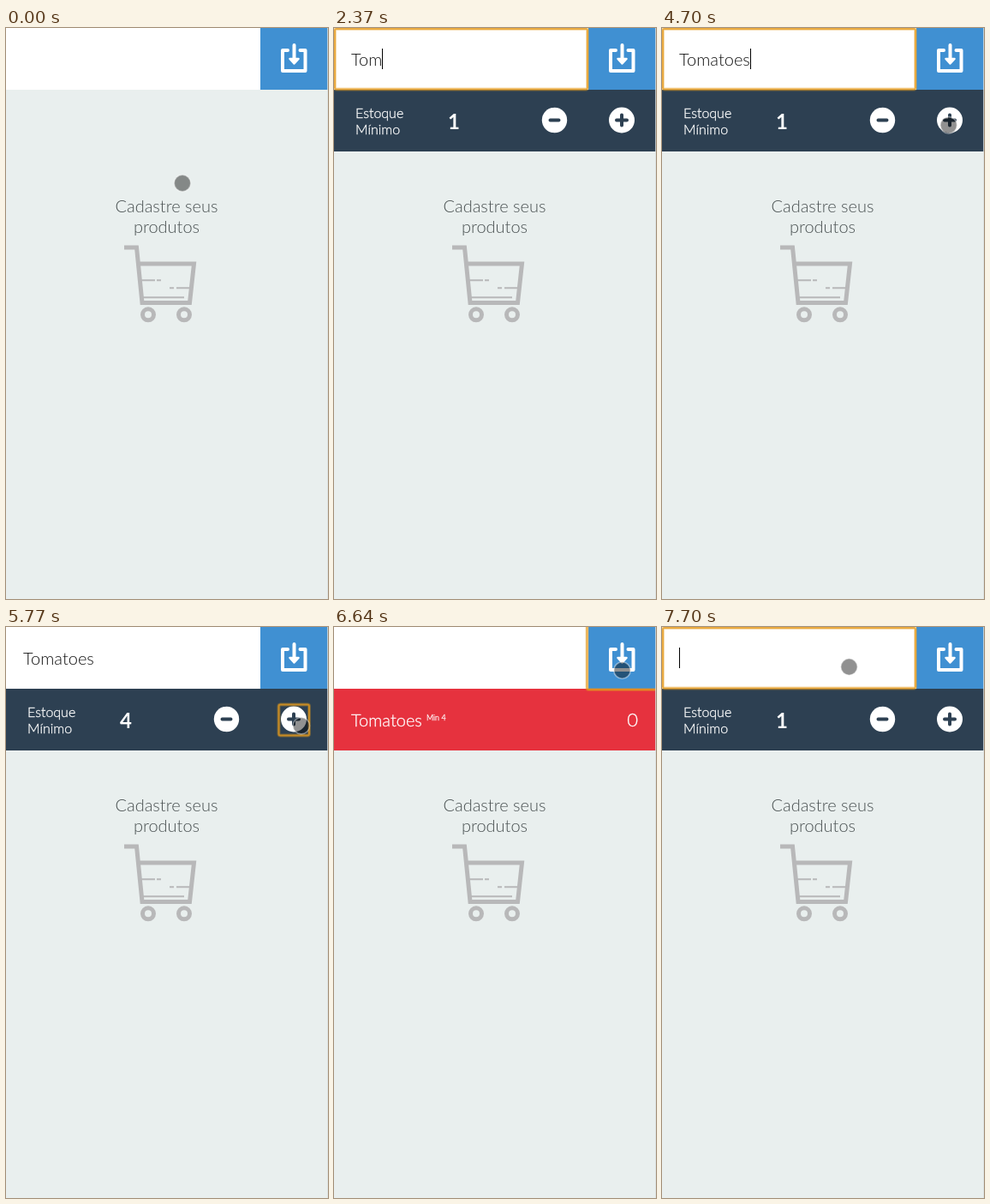
Animation, 376 px wide and 666 px high, one loop 8 s. Source, as an HTML page:

```html
<!DOCTYPE html>
<html lang="pt">
<head>
<meta charset="utf-8">
<title>Cadastro de produtos</title>
<style>
  html, body { margin: 0; width: 100%; height: 100%; overflow: hidden; background: #e9efee; }
  svg { display: block; font: 300 20px Lato, sans-serif; }
  .white { fill: #fff; stroke: #fff; stroke-width: .3; }
  .ring { fill: none; stroke: #e59a1c; }
  .ring rect:first-child { stroke-width: 4; opacity: .35; }
  .ring rect:last-child { stroke-width: 2; opacity: .75; }
</style>
</head>
<body>
<svg width="376" height="666" viewBox="0 0 376 666">
  <rect width="376" height="666" fill="#e9efee"/>
  <g fill="#4a5152" text-anchor="middle">
    <text x="187.5" y="215">Cadastre seus</text>
    <text x="187.5" y="239">produtos</text>
  </g>
  <g fill="none" stroke="#b8b8b9" stroke-width="5">
    <path d="M138 256H152.5L159 320.5H214.5L219.5 275H155"/>
    <circle cx="166" cy="334.300" r="6.500"/>
    <circle cx="208" cy="334.300" r="6.500"/>
    <path stroke-width="2" d="M157 294.300H174M176 294.300H181M191 303.300H196M199 303.300H214M160 314.300H208"/>
  </g>

  <rect width="297" height="72" fill="#fff"/>
  <text id="typed" x="20" y="44" fill="#111"></text>
  <rect id="caret" y="24" width="1" height="24" fill="#000"/>

  <g id="form">
    <rect y="72" width="376" height="72" fill="#2d4052"/>
    <g class="white" font-size="16">
      <text x="25" y="105">Estoque</text>
      <text x="25" y="124">Mínimo</text>
    </g>
    <text id="count" x="140" y="118" fill="#fff" font-size="24" font-weight="700" text-anchor="middle"></text>
    <g fill="#fff">
      <circle cx="257.500" cy="107.500" r="14.700"/>
      <circle cx="336" cy="107.500" r="15"/>
    </g>
    <path stroke="#2d4052" stroke-width="4" stroke-linecap="round" d="M252.500 107.500h10M330 107.500h12M336 101.500v12"/>
  </g>

  <g id="row">
    <rect y="72" width="376" height="72" fill="#e6323e"/>
    <text class="white" x="20" y="116">Tomatoes</text>
    <text class="white" x="108" y="109" font-size="9">Min 4</text>
    <text class="white" x="355" y="116" font-size="22" text-anchor="end">0</text>
  </g>

  <rect x="297" width="79" height="72" fill="#4090d2"/>
  <g fill="none" stroke="#fff" stroke-width="4" stroke-linecap="round" stroke-linejoin="round">
    <path d="M329 26H323V50H349.500V26H343.500M336.500 20V36"/>
    <path d="M331.500 36h10l-5 5.500z" fill="#fff" stroke-width="2.500"/>
  </g>

  <g id="inputRing" class="ring"></g>
  <g id="plusRing" class="ring"></g>
  <g id="saveRing" class="ring"></g>
  <rect x="375" width="1" height="666" fill="#d9dedd" opacity=".8"/>
  <circle id="pointer" r="9.700" fill="#000" fill-opacity=".43" stroke="#fff" stroke-opacity=".42" stroke-width="1.600"/>
</svg>
<script>
const LOOP = 8000;
const $ = id => document.getElementById(id);
const show = (id, on) => $(id).setAttribute('visibility', on ? 'visible' : 'hidden');
const within = (t, from, to) => t >= from && t < to;
const passed = (t, times) => times.filter(time => t >= time).length;

function ring(id, x, y, w, h) {
  const rect = `<rect x="${x}" y="${y}" width="${w}" height="${h}" rx="2"/>`;
  $(id).innerHTML = rect + rect;
}
ring('inputRing', 1, 1, 295, 70.5);
ring('plusRing', 318.5, 90.5, 35.5, 36);
ring('saveRing', 295.5, -2, 84, 75);

const keyTimes = [2040, 2170, 2370, 2570, 3040, 3100, 3240, 3640];
const clickTimes = [5040, 5440, 5770];
const STEP = 67;
const moves = [
  { start: 500, steps: 5, from: [206, 181], to: [103.5, 27.5] },
  { start: 4240, steps: 8, from: [106, 32], to: [345, 117] },
  { start: 5770, steps: 10, from: [345, 117], to: [336.5, 50.5] },
  { start: 6970, steps: 8, from: [336.5, 50.5], to: [218.5, 46.5] }
];

function pointerAt(t) {
  const move = moves.filter(m => t >= m.start).pop();
  if (!move) return moves[0].from;
  const k = Math.min(1, (Math.floor((t - move.start) / STEP) + 1) / move.steps);
  const eased = k * k * (3 - 2 * k);
  return move.from.map((a, i) => a + (move.to[i] - a) * eased);
}

function pointerAlpha(t) {
  return within(t, 1900, 4240) ? [.6, .35, .15, 0][passed(t, [2040, 2100, 2170])] : 1;
}

function draw(t) {
  const reopened = t >= 7700;
  const focused = within(t, 1040, 5040) || reopened;
  const saved = within(t, 6640, 7700);
  const caretOff = within(t, 1500, 2040) || within(t, 4100, 4630);

  $('typed').textContent = t < 6640 ? 'Tomatoes'.slice(0, passed(t, keyTimes)) : '';
  $('caret').setAttribute('x', 20 + Math.round($('typed').getComputedTextLength()));
  $('count').textContent = reopened ? 1 : 1 + passed(t, clickTimes);

  show('caret', focused && !caretOff);
  show('form', within(t, 1040, 6640) || reopened);
  show('row', saved);
  show('inputRing', focused);
  show('plusRing', within(t, 5040, 6640));
  show('saveRing', saved);

  $('pointer').setAttribute('transform', `translate(${pointerAt(t)})`);
  $('pointer').setAttribute('opacity', pointerAlpha(t));
}

function tick() {
  draw(performance.now() % LOOP);
  requestAnimationFrame(tick);
}
tick();
</script>
</body>
</html>
```
